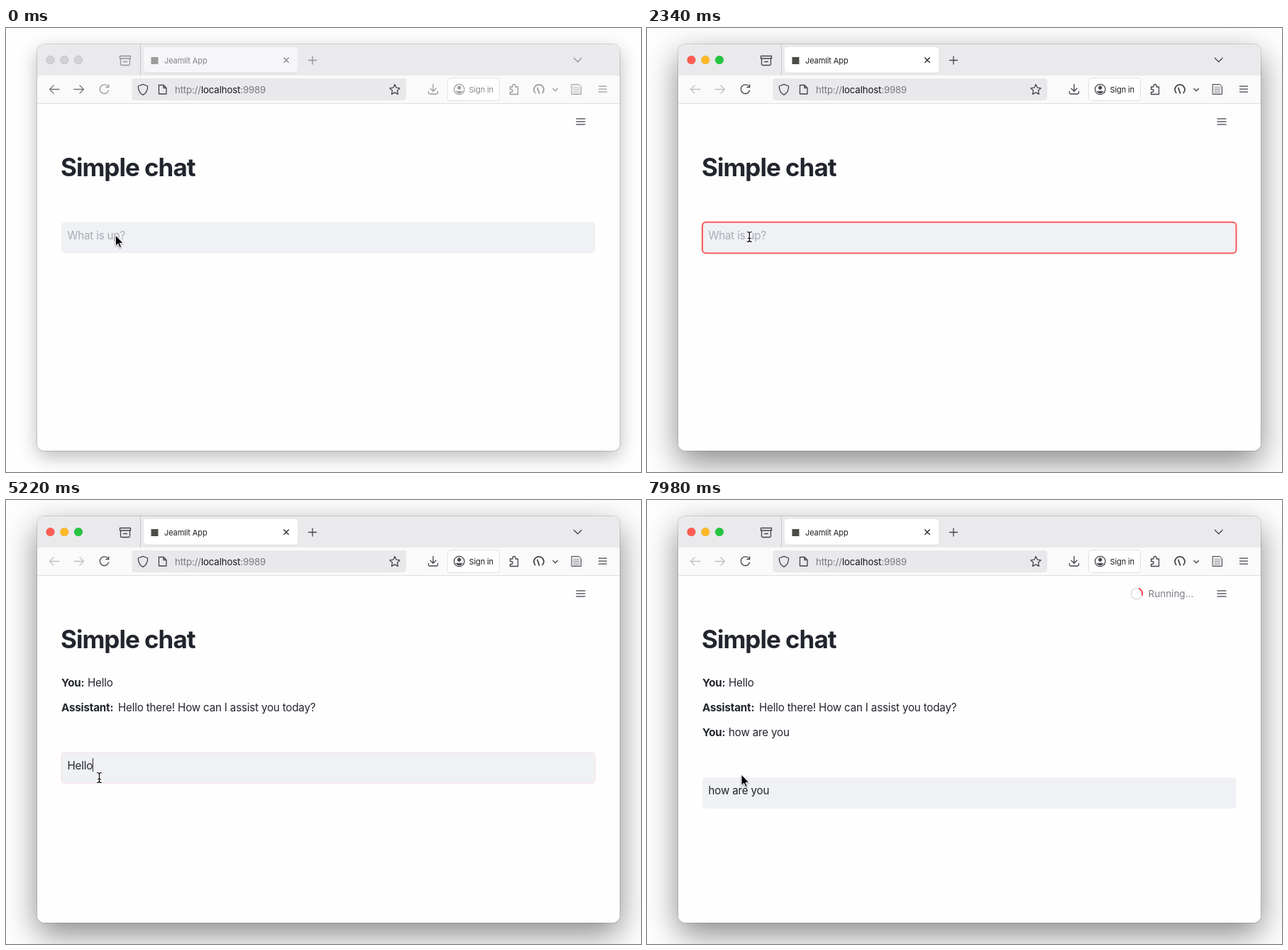
An HTML page for the animation above (8000 ms loop, 895 by 626 pixels).

```html
<!DOCTYPE html>
<html lang="en">
<head>
<meta charset="utf-8">
<title>Simple chat</title>
<style>
  html, body { margin: 0; width: 100%; height: 100%; overflow: hidden; background: #fefefe; }
  .shadow { position: absolute; left: 44px; top: 23px; width: 821px; height: 573px; border-radius: 10px; }
  #idleShadow { box-shadow: 0 8px 26px rgba(0,0,0,.27), 0 0 0 1px rgba(0,0,0,.13); }
  #liveShadow { box-shadow: 0 16px 46px rgba(0,0,0,.47), 0 0 0 1px rgba(0,0,0,.13); }
  svg { position: absolute; left: 0; top: 0; width: 895px; height: 626px; display: block; }
  text { font-family: Inter, "Open Sans", sans-serif; white-space: pre; }
  .body { font-size: 15.2px; letter-spacing: -.2px; fill: #22252d; }
  .bold { font-weight: 700; }
  .title { font-size: 35px; font-weight: 700; letter-spacing: -1px; fill: #22252d; }
  .ui { font-size: 11px; letter-spacing: -.1px; fill: #1b1b22; }
  .url { font-size: 13.2px; letter-spacing: -.12px; fill: #77777e; }
  .url tspan { fill: #17171c; }
  .hint { font-size: 11px; letter-spacing: -.05px; fill: #9a9ca5; text-anchor: end; }
  .run { font-size: 13.5px; fill: #7b7d86; }
  .icon { fill: none; stroke: #44444c; stroke-width: 1.3; stroke-linecap: round; stroke-linejoin: round; }
</style>
</head>
<body>
<div id="idleShadow" class="shadow"></div>
<div id="liveShadow" class="shadow"></div>
<svg viewBox="0 0 895 626">
  <defs>
    <clipPath id="frame"><rect x="44" y="23" width="821" height="573" rx="10"/></clipPath>
  </defs>

  <g clip-path="url(#frame)">
    <rect x="44" y="23" width="821" height="573" fill="#fefefe"/>
    <rect x="44" y="23" width="821" height="44" fill="#eaeaec"/>
    <rect x="44" y="67" width="821" height="39" fill="#fafafb"/>
    <path d="M44 106.5H865" stroke="#dfdfe2"/>
    <path d="M189.5 23V67" stroke="#c9c9cd"/>
  </g>

  <!-- traffic lights -->
  <g fill="#d2d2d4" stroke="#bcbcbf" stroke-width=".8">
    <circle cx="62.5" cy="45" r="5.7"/><circle cx="82.3" cy="45" r="5.7"/><circle cx="102" cy="45" r="5.7"/>
  </g>
  <g class="live">
    <circle cx="62.5" cy="45" r="6" fill="#ff5c54"/>
    <circle cx="82.3" cy="45" r="6" fill="#fdb927"/>
    <circle cx="102" cy="45" r="6" fill="#27c53f"/>
  </g>

  <!-- tab -->
  <rect x="194" y="28" width="217" height="36" rx="4.5" fill="#d5d5d9"/>
  <rect x="194" y="27" width="217" height="36" rx="4.5" fill="#f6f6f8"/>
  <rect class="live" x="194" y="27" width="217" height="36" rx="4.5" fill="#fff"/>
  <g class="dim">
    <rect x="204.5" y="41" width="10" height="10" fill="#4b4b48"/>
    <text class="ui" x="223" y="49.7">Jeamlit App</text>
    <g class="icon">
      <path d="M160.5 39.5H175.5V43H160.5ZM161.5 43V51Q161.5 52.5 163 52.5H173Q174.5 52.5 174.5 51V43M165.5 47.5H170.5"/>
      <path d="M391.7 42L398.3 48.6M398.3 42L391.7 48.6" stroke="#18181d"/>
      <path d="M426.5 45.5H437.5M432 40V51M800.5 42.5L805.8 47.7 811 42.5"/>
    </g>
  </g>

  <!-- navigation -->
  <g id="nav" class="icon">
    <path d="M75 86.5H61.5M67 81L61.5 86.5 67 92M96 86.5H109.5M104 81L109.5 86.5 104 92"/>
  </g>
  <path class="icon dim" d="M144 83A6.3 6.3 0 1 0 144.6 88M144.7 79.8V83.7H140.8"/>

  <!-- address bar -->
  <rect x="177.5" y="71" width="386.5" height="31" rx="4" fill="#e9e9ec"/>
  <g class="icon">
    <path d="M193 79.3L199.7 82C199.7 88 197.7 92 193 94.3 188.3 92 186.3 88 186.3 82Z"/>
    <path d="M215.5 80.5H222L226 84.5V93H215.5ZM222 80.5V84.5H226"/>
    <path d="M548 79.5L550.2 84.2 555.2 84.8 551.5 88.3 552.5 93.4 548 90.9 543.5 93.4 544.5 88.3 540.8 84.8 545.8 84.2Z"/>
  </g>
  <text class="url" x="238" y="91.5">http://<tspan>localhost</tspan>:9989</text>

  <!-- toolbar -->
  <rect x="622.5" y="70.5" width="73" height="32" rx="4" fill="#fff" stroke="#e1e1e5"/>
  <g class="dim">
    <text class="ui" x="652.5" y="90.6">Sign in</text>
    <g class="icon">
      <path d="M602 79.5V89M598 85.2L602 89.2 606 85.2M595.5 89.5V91.5Q595.5 93 597 93H607Q608.5 93 608.5 91.5V89.5"/>
      <circle cx="638.8" cy="86.5" r="7.2"/>
      <path d="M638.8 81.8A2.4 2.4 0 1 1 638.7 81.8M634.3 89.2H643.3Q642 92 638.8 92T634.3 89.2" fill="#44444c" stroke-width=".6"/>
      <path d="M710.5 83H714V81.5A2 2 0 0 1 718 81.5V83H721.5V93.5H710.5V90.5H712A2 2 0 0 0 712 86.5H710.5Z"/>
      <path d="M745.8 91.5A7 7 0 1 1 756.2 91.5M751.5 92L749 84.5" stroke-width="1.8"/>
      <path d="M771 85.5L774.2 88.7 777.4 85.5"/>
      <path d="M797.5 79.5H807.5L810.5 82.5V93.5H797.5Z" fill="#e7e7ea" stroke-width="1"/>
      <path d="M800 84H808M800 86.5H808M800 89H808M800 91.5H808" stroke="#8a8a90" stroke-width=".8"/>
      <path d="M835.5 82.2H846.5M835.5 86.2H846.5M835.5 90.2H846.5"/>
    </g>
  </g>

  <!-- page -->
  <path d="M803.5 128H816.5M803.5 132H816.5M803.5 136H816.5" stroke="#5d606a" stroke-width="1.4"/>
  <g id="running">
    <circle cx="690.3" cy="132" r="7.8" fill="none" stroke="#dddde0" stroke-width="1.6"/>
    <path id="spin" d="M684.8 126.5A7.8 7.8 0 0 1 695.8 126.5" fill="none" stroke="#f5383c" stroke-width="1.8"/>
    <text class="run" x="706.5" y="137">Running...</text>
  </g>
  <text class="title" x="77" y="209">Simple chat</text>
  <g id="you1" class="body">
    <text class="bold" x="78" y="262.5">You:</text><text x="115" y="262.5">Hello</text>
  </g>
  <g id="reply" class="body">
    <text class="bold" x="78" y="298">Assistant:</text><text x="158" y="298">Hello there! How can I assist you today?</text>
  </g>
  <g id="you2" class="body">
    <text class="bold" x="78" y="333">You:</text><text x="115" y="333">how are you</text>
  </g>

  <g id="field">
    <rect x="78" y="-.3" width="752.5" height="43.8" rx="5" fill="#f0f1f5"/>
    <rect id="ring" x="78" y="-.3" width="752.5" height="43.8" rx="5" fill="none" stroke="#fc5c5e"/>
    <rect id="mark" x="87" y="8" height="19" fill="#b4d7ff"/>
    <text id="ghost" class="body" x="86.5" y="23.5" style="fill:#a9abb3">What is up?</text>
    <text id="typed" class="body" x="86.5" y="23.5" xml:space="preserve"></text>
    <rect id="caret" y="8" width="1" height="19" fill="#22252d"/>
    <text id="hint" class="hint" x="822" y="35">Press enter to apply</text>
  </g>

  <path id="arrow" d="M0 0V15.5L3.6 12.2 6 17.8 8.3 16.8 6 11.4H10.9Z" fill="#000" stroke="#fff" stroke-width="1" stroke-linejoin="round" style="filter:drop-shadow(0 1px 1px rgba(0,0,0,.35))"/>
  <g id="beam" fill="none" stroke-linecap="round">
    <path d="M-3-7Q0-7 0-5V5Q0 7-3 7M3-7Q0-7 0-5M0 5Q0 7 3 7M-2 2H2" stroke="#fff" stroke-width="2.6"/>
    <path d="M-3-7Q0-7 0-5V5Q0 7-3 7M3-7Q0-7 0-5M0 5Q0 7 3 7M-2 2H2" stroke="#000" stroke-width="1.2"/>
  </g>
</svg>

<script>
const LOOP = 8000, TICK = 60;
const el = id => document.getElementById(id);
const all = sel => [...document.querySelectorAll(sel)];
const clamp = v => Math.min(1, Math.max(0, v));
const within = (t, spans) => spans.some(([a, b]) => t >= a && t < b);
const show = (id, on) => { el(id).style.display = on ? "" : "none"; };
const place = (id, x, y) => el(id).setAttribute("transform", `translate(${x} ${y})`);
const latest = (t, rows) => rows.filter(r => r[0] <= t).pop()[1];

const typing = [
  [0, ""], [2880, "H"], [3060, "He"], [3240, "Hel"], [3360, "Hell"], [3540, "Hello"],
  [5940, "h"], [6180, "ho"], [6240, "how"], [6300, "how "], [6480, "how a"], [6660, "how ar"],
  [6720, "how are"], [6780, "how are "], [7080, "how are y"], [7140, "how are yo"], [7380, "how are you"]
];
const fieldTop = [[0, 274], [4200, 321], [4800, 356], [7920, 391.5]];
const carets = [[1620, 2340], [2880, 4080], [5220, 5520], [5940, 7800]];
const hints = [[2880, 4080], [5940, 7800]];
const runs = [[4080, 4860], [7800, LOOP]];
const focus = [[1580, 4200], [5190, 7920]];
const FADE = 220;

// time, x, y of the pointer
const pointer = [
  [0, 154.3, 292], [1500, 154.3, 292], [1560, 144.3, 294.5], [4140, 144.3, 294.5], [4500, 130.5, 330],
  [4860, 131, 373], [5040, 131.5, 391.5], [5340, 131.5, 391.5], [5460, 133.5, 388.5],
  [7800, 133.5, 388.5], [7980, 133, 387], [LOOP, 133, 387]
];
function pointerAt(t) {
  const i = pointer.findIndex(p => p[0] > t);
  const [t0, x0, y0] = pointer[i - 1], [t1, x1, y1] = pointer[i];
  const k = (t - t0) / (t1 - t0);
  return [x0 + (x1 - x0) * k, y0 + (y1 - y0) * k];
}

function draw(t) {
  const live = clamp((t - 1020) / 180);
  const power = t < 1080 ? 0 : live;
  all(".live").forEach(n => n.style.opacity = power);
  all(".dim").forEach(n => n.style.opacity = .52 + .48 * power);
  el("nav").style.opacity = .72 - .4 * power;
  el("idleShadow").style.opacity = 1 - power;
  el("liveShadow").style.opacity = power;

  const run = runs.find(([a, b]) => t >= a && t < b);
  show("running", run);
  if (run) el("spin").setAttribute("transform", `rotate(${(t - run[0]) * .36} 690.3 132)`);
  show("you1", t >= 4200);
  show("reply", t >= 4800);
  show("you2", t >= 7920);

  const top = latest(t, fieldTop), text = latest(t, typing);
  place("field", 0, top);
  const lit = focus.find(([a, b]) => t >= a && t < b);
  const glow = lit ? clamp((t - lit[0]) / FADE) : 0;
  el("ring").style.opacity = glow;
  el("ring").setAttribute("stroke-width", 1 + 1.1 * glow);

  if (el("typed").textContent !== text) el("typed").textContent = text;
  const width = text ? el("typed").getComputedTextLength() : 0;
  show("ghost", !text);
  show("hint", within(t, hints));
  show("caret", within(t, carets));
  el("caret").setAttribute("x", Math.round(86.5 + width));
  show("mark", t >= 5520 && t < 5940);
  el("mark").setAttribute("width", width);

  const [x, y] = pointerAt(t);
  const over = t >= 1140 && y >= top && y <= top + 43;
  show("beam", over);
  show("arrow", !over);
  place(over ? "beam" : "arrow", x, y);
}

const start = performance.now();
function loop() {
  const t = (performance.now() - start) % LOOP;
  draw(Math.floor(t / TICK) * TICK);
  requestAnimationFrame(loop);
}
loop();
</script>
</body>
</html>
```
